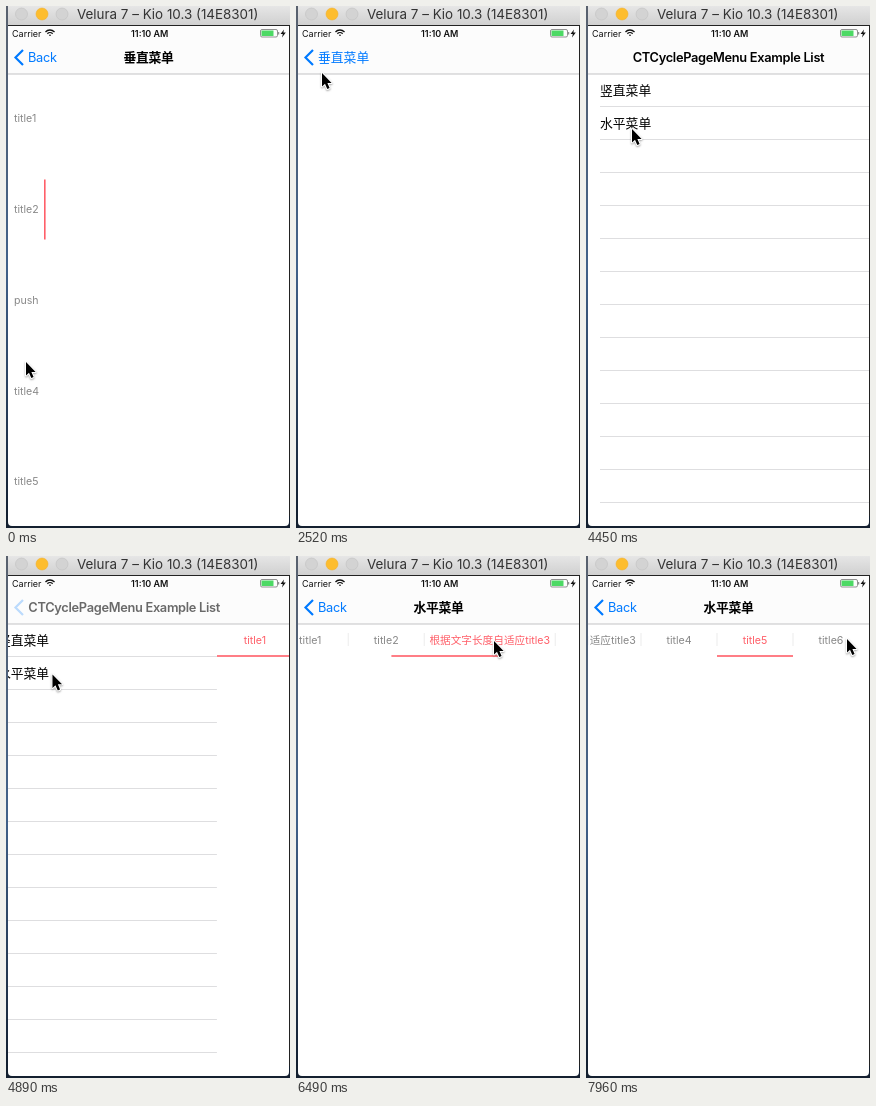
These frames come from a looping animation (284x522 px, 8 s). An HTML page with a canvas:

```html
<!DOCTYPE html>
<html lang="zh-CN">
<head>
<meta charset="utf-8">
<title>Page menu demo</title>
<style>
html, body { margin: 0; width: 100%; height: 100%; overflow: hidden; }
canvas { display: block; }
</style>
</head>
<body>
<canvas id="stage" width="284" height="522"></canvas>
<script>
const ctx = document.getElementById('stage').getContext('2d');
const LOOP = 8000, BLUE = '#007aff', RED = '#ff5f69', GREY = '#888';
const FAMILY = 'Inter, "Noto Sans CJK SC", "Noto Sans CJK", sans-serif';

// Cursor strokes: from step, to step, end point
const strokes = [[0, 4, 20, 468], [7, 12, 20, 292], [13, 17, 26, 67], [17, 20, 27, 50], [25, 30, 46, 123],
  [32, 36, 49, 94], [36, 38, 108, 85], [40, 42, 198, 85], [45, 48, 245, 86], [51, 54, 261, 83]];

const tabs = ['title1', 'title2', '根据文字长度自适应title3', 'title4', 'title5', 'title6'];
const edges = [2];
tabs.forEach((s, i) => edges.push(edges[i] + (s.length > 6 ? 131 : 76)));
const center = i => (edges[i] + edges[i + 1]) / 2;
const maxScroll = edges[tabs.length] - 283;
const hops = [38.3, 42.8, 48, 51], HOP = 2.2, LAG = 0.35;

const mix = (a, b, f) => a + (b - a) * f;
const clamp = (v, lo, hi) => Math.min(hi, Math.max(lo, v));

function ease(k, from, to) {
  const f = clamp((k - from) / (to - from), 0, 1);
  return f * f * (3 - 2 * f);
}

const hopSum = k => hops.reduce((sum, h) => sum + ease(k, h, h + HOP), 0);
const slide = (k, from) => ease(k, from, from + 3);
const depthAt = k => 1 + slide(k, 12) - slide(k, 19) - slide(k, 24) + slide(k, 32);

// Each hop brings the chosen tab towards the middle
const scrollAt = k => hops.reduce((x, h, i) =>
  mix(x, clamp(center(i + 1) - 142, 0, maxScroll), ease(k, h + LAG, h + LAG + HOP)), 0);

const cursorAt = k => strokes.reduce(([x, y], [from, to, toX, toY]) => {
  const f = ease(k, from, to);
  return [mix(x, toX, f), mix(y, toY, f)];
}, [20, 356]);

function rect(x, y, w, h, color) {
  ctx.fillStyle = color;
  ctx.fillRect(x, y, w, h);
}

function text(s, x, y, size, color, align = 'left', weight = 400, spacing = 0) {
  ctx.font = `${weight} ${size}px ${FAMILY}`;
  ctx.letterSpacing = spacing + 'px';
  ctx.textAlign = align;
  ctx.fillStyle = color;
  ctx.fillText(s, x, y);
}

function trace(points, close) {
  ctx.beginPath();
  points.forEach(([x, y]) => ctx.lineTo(x, y));
  if (close) ctx.closePath();
}

function fade(height, ...colors) {
  const g = ctx.createLinearGradient(0, 0, 0, height);
  colors.forEach((c, i) => g.addColorStop(i / (colors.length - 1), c));
  return g;
}

function disc(x, fill, edge) {
  ctx.beginPath();
  ctx.arc(x, 8, 6, 0, 7);
  ctx.fillStyle = fill;
  ctx.fill();
  ctx.strokeStyle = edge;
  ctx.lineWidth = 0.6;
  ctx.stroke();
}

const list = {
  title: 'CTCyclePageMenu Example List',
  draw() {
    text('竖直菜单', 14, 88.5, 12.8, '#000');
    text('水平菜单', 14, 121.5, 12.8, '#000');
    for (let y = 100; y < 520; y += 33) rect(14, y, 270, 1, '#dedee0');
  }
};

const vertical = {
  title: '垂直菜单', back: 'Back',
  draw(k) {
    ['title1', 'title2', 'push', 'title4', 'title5'].forEach((s, i) => {
      text(s, 8, 116.3 + i * 90.75, 10.6, GREY);
      if (i > 1 && k > 4) rect(14, 248 + (i - 2) * 91, 14, 1, '#e8e8e8');
    });
    rect(38, 173.5 + ease(k, 4, 6) * 272.3, 1.6, 60, RED);
  }
};

const blank = { title: '', back: '垂直菜单', draw() {} };

const horizontal = {
  title: '水平菜单', back: 'Back',
  draw(k) {
    const pos = hopSum(k), i = Math.floor(pos), f = pos - i;
    ctx.translate(-scrollAt(k), 0);
    tabs.forEach((s, n) => {
      text(s, center(n), 87.5, 10.65, n === Math.ceil(pos) ? RED : GREY, 'center');
      if (n) rect(edges[n] - 0.5, 77, 1, 13, '#ececec');
    });
    const left = mix(edges[i], edges[i + 1], f), right = mix(edges[i + 1], edges[i + 2], f);
    rect(left, 99.2, right - left, 1.6, RED);
  }
};

function drawPage(page, x, k) {
  ctx.save();
  ctx.translate(x, 0);
  rect(2, 68, 282, 454, '#fff');
  ctx.beginPath();
  ctx.rect(2, 68, 281, 454);
  ctx.clip();
  page.draw(k);
  ctx.restore();
}

function drawNav(stack, depth) {
  rect(2, 20, 282, 48, '#fcfcfc');
  rect(2, 67.5, 282, 1, '#c4c4c6');
  ctx.save();
  stack.forEach((page, j) => {
    const u = depth - j;
    ctx.globalAlpha = Math.max(0, 1 - 1.6 * Math.abs(u));
    text(page.title, 142.5 - u * (u > 0 ? 94 : 141), 56, 12.8, '#000', 'center', 600, -0.3);
    if (page.back) text(page.back, 22 - u * (u > 0 ? 60 : 90), 56, 12.8, BLUE, 'left', 400, page === blank ? 0 : -0.3);
  });
  ctx.globalAlpha = Math.min(1, depth);
  ctx.strokeStyle = BLUE;
  ctx.lineWidth = 2.2;
  trace([[17, 44], [9.5, 51.5], [17, 59]]);
  ctx.stroke();
  ctx.restore();
}

function drawStatus() {
  text('Carrier', 6, 30.5, 9, '#111');
  text('11:10 AM', 143.7, 30.5, 9, '#111', 'center', 600);
  ctx.strokeStyle = '#111';
  ctx.lineWidth = 1.3;
  for (let r = 1; r < 7; r += 2.6) {
    ctx.beginPath();
    ctx.arc(44, 30.2, r, -Math.PI * 0.76, -Math.PI * 0.24);
    ctx.stroke();
  }
  ctx.lineWidth = 0.8;
  ctx.strokeStyle = '#777';
  ctx.beginPath();
  ctx.roundRect(254.5, 23.5, 17, 7.5, 1.5);
  ctx.stroke();
  rect(255.5, 24.5, 12, 5.5, '#4cd964');
  rect(272.2, 26, 1, 2.5, '#777');
  trace([[278, 23.5], [274.5, 28], [276.8, 28], [276, 31.5], [279.8, 26.6], [277.4, 26.6]], true);
  ctx.fillStyle = '#111';
  ctx.fill();
}

function drawWindow() {
  rect(2, 0, 282, 19, fade(19, '#e6e6e6', '#d0d0d0'));
  rect(2, 19, 282, 1, '#222');
  disc(15.5, '#d3d3d3', '#c2c2c2');
  disc(36, '#fdbd2e', '#f2b02c');
  disc(56, '#d3d3d3', '#c2c2c2');
  text('Velura 7 – Kio 10.3 (14E8301)', 71, 13, 13.4, '#333');
  rect(0, 0, 2, 522, fade(522, '#59616d', '#41618a', '#101c2c'));
  rect(283, 20, 1, 502, '#222');
  // Rounded lower window corners
  ctx.save();
  ctx.beginPath();
  ctx.rect(0, 510, 284, 12);
  ctx.roundRect(2, 490, 281, 30, [0, 0, 4, 4]);
  ctx.clip('evenodd');
  rect(0, 510, 284, 12, '#142030');
  ctx.restore();
}

function drawCursor(x, y) {
  ctx.save();
  ctx.translate(x, y);
  trace([[0, 0], [0, 13.5], [3, 10.8], [5.3, 16], [7.6, 15], [5.4, 9.9], [9.6, 9.9]], true);
  ctx.shadowColor = 'rgba(0,0,0,.35)';
  ctx.shadowBlur = 2;
  ctx.shadowOffsetY = 1;
  ctx.lineJoin = 'round';
  ctx.lineWidth = 2;
  ctx.strokeStyle = '#fff';
  ctx.stroke();
  ctx.shadowColor = 'transparent';
  ctx.fillStyle = '#000';
  ctx.fill();
  ctx.restore();
}

function render(t) {
  // The screen refreshes about seven times a second
  const k = Math.floor(t / (t < 5400 ? 148 : 147.4));
  const stack = k < 30 ? [list, vertical, blank] : [list, horizontal];
  const depth = depthAt(k), i = Math.floor(depth), f = depth - i;
  rect(0, 0, 284, 522, '#fff');
  drawPage(stack[i], -85 * f, k);
  if (f) drawPage(stack[i + 1], 282 * (1 - f), k);
  drawNav(stack, depth);
  drawStatus();
  drawWindow();
  drawCursor(...cursorAt(k));
}

const start = performance.now();
function tick() {
  render((performance.now() - start) % LOOP);
  requestAnimationFrame(tick);
}
tick();
</script>
</body>
</html>
```
